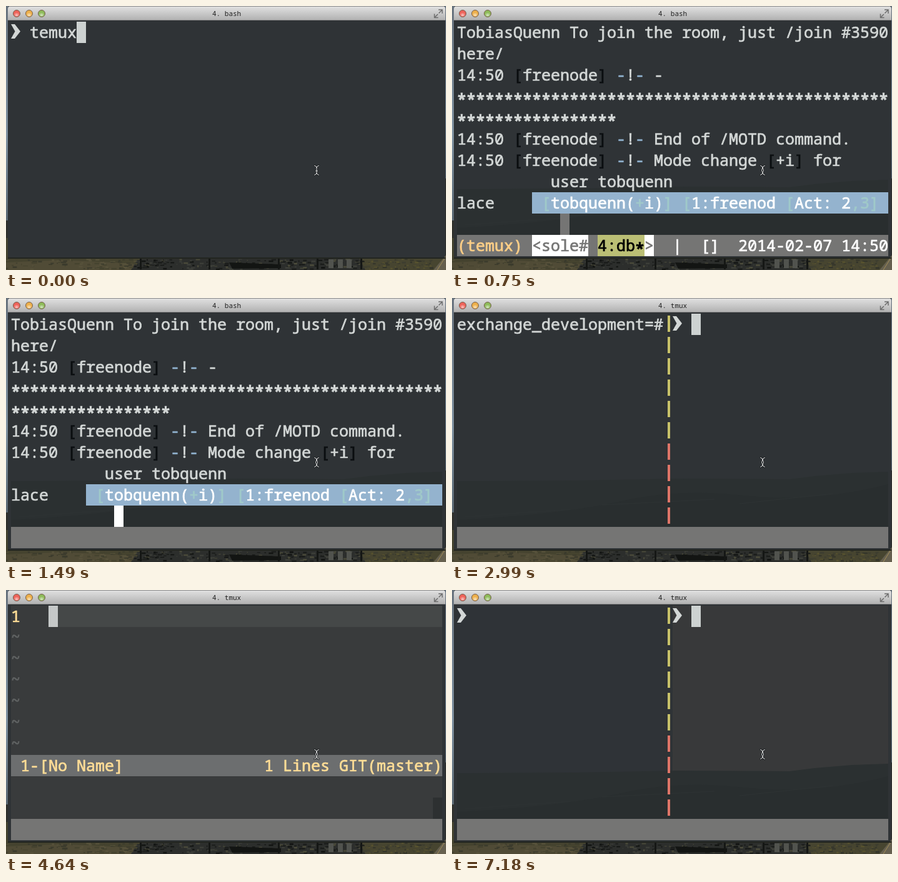
Recreate the animation shown at these times as an HTML page. Size 704 px wide and 421 px high, loop 8 s.

```html
<!DOCTYPE html>
<html lang="en">
<head>
<meta charset="utf-8">
<title>Terminal session</title>
<style>
  html, body { margin: 0; width: 100%; height: 100%; overflow: hidden; background: #2f3336; }
  svg { display: block; width: 704px; height: 421px; }
  text { font-family: "Noto Sans Mono", "DejaVu Sans Mono", monospace; white-space: pre; }
</style>
</head>
<body>
<svg id="stage" viewBox="0 0 704 421" xmlns="http://www.w3.org/2000/svg">
  <defs>
    <linearGradient id="bar" x2="0" y2="1">
      <stop stop-color="#e2e2e2"/><stop offset="1" stop-color="#b0b0b0"/>
    </linearGradient>
    <linearGradient id="sky" x2="0" y2="1">
      <stop stop-color="#67727d"/><stop offset=".6" stop-color="#8294a3"/><stop offset="1" stop-color="#5c6a75"/>
    </linearGradient>
    <radialGradient id="gloss" cy=".8">
      <stop stop-color="#fff" stop-opacity=".65"/><stop offset="1" stop-color="#fff" stop-opacity="0"/>
    </radialGradient>
  </defs>
  <g id="desktop"></g>
  <path d="M3 23H703V396Q703 401 698 401H8Q3 401 3 396Z" fill="#2f3336"/>
  <g id="screens"></g>
  <g id="chrome">
    <path d="M3 23V5Q3 0 8 0H698Q703 0 703 5V23Z" fill="url(#bar)"/>
    <path d="M6 .5H700" stroke="#8a8a8a"/>
    <path d="M3 22.5H703" stroke="#8c8c8c"/>
    <path d="M692 6H698V12M698 6L692.5 11.5M685.500 12.500V18.500H691.500M685.500 18.500L691 13" fill="none" stroke="#6c6c6c" stroke-width="1.500"/>
    <text id="title" x="330" y="16" font-size="11" fill="#222"></text>
  </g>
  <g id="mouse" fill="none" stroke-linecap="round"></g>
</svg>
<script>
const NS = "http://www.w3.org/2000/svg";
const CELL = 15, ROW = 34, LEFT = 8, TOP = 25;
const LOOP = 8000;
const INK = "#d3d7d6", DARK = "#0b0e10", BLUE = "#91b2cf", TEAL = "#a0c9c9";
const GOLD = "#ffdd96", GRAY = "#757574", DIM = "#616464", OLIVE = "#bcbd68", WHITE = "#fff";
const byId = id => document.getElementById(id);

function add(parent, tag, attrs, content) {
  const node = document.createElementNS(NS, tag);
  for (const key in attrs) node.setAttribute(key, attrs[key]);
  if (content !== undefined) node.textContent = content;
  parent.append(node);
  return node;
}
const rect = (g, x, y, width, height, fill) => add(g, "rect", { x, y, width, height, fill });
const path = (g, d, fill, extra) => add(g, "path", { d, fill, ...extra });
const cells = (g, col, row, cols, fill, rows = 1) =>
  rect(g, LEFT + col * CELL, TOP + row * ROW, cols * CELL, rows * ROW, fill);
// The thin outline gives the text a medium weight.
const put = (g, col, row, str, fill = INK, dy = 0, weight = 0.7) => add(g, "text", {
  x: LEFT + col * CELL, y: TOP + row * ROW + 26 + dy, fill, "font-size": 25, stroke: fill, "stroke-width": weight,
}, str);

// Alternating strings and colours, set one after another on a row.
function spans(g, col, row, ...parts) {
  for (let i = 0; i < parts.length; i += 2) {
    put(g, col, row, parts[i], parts[i + 1]);
    col += parts[i].length;
  }
}
const stars = (g, col, row, n, fill) => put(g, col, row, "*".repeat(n), fill, 5, 1.4);

function prompt(g, col) {
  path(g, `M${LEFT + col * CELL} 29h6l9 11.500l-9 11.500h-6l6.500-11.500z`, INK);
}
const cursor = (g, col, row, fill = "#cdd2d1") => cells(g, col, row, 1, fill);
const statusBar = g => cells(g, 0, 10, 46, GRAY);

function hills(g) {
  path(g, "M8 292L200 291L360 288L540 289L580 284L640 279L698 277V365H8Z", "#2b3031");
  path(g, "M8 354Q180 345 270 324T470 315T698 297V365H8Z", "#292e2f");
  path(g, "M20 349L190 337M240 330L420 321M460 328L610 312", "none", { stroke: "#2e3334" });
}

function divider(g) {
  for (let row = 0; row < 10; row++)
    rect(g, 345, TOP + row * ROW + 3, 4, 26, row < 6 ? "#c8c269" : "#df7568");
}
function rightPane(g) {
  divider(g);
  prompt(g, 23);
  cursor(g, 25, 0);
}
function tildes(g, first) {
  for (let row = first; row < 7; row++) put(g, 0, row, "~", DIM, -2);
}

function chat(g, cursorFill) {
  hills(g);
  put(g, 0, 0, "TobiasQuenn To join the room, just /join #3590");
  put(g, 0, 1, "here/");
  const notice = (row, ...rest) => spans(g, 0, row, "14:50 ", INK, "[", DARK, "freenode", INK, "] ", DARK,
    "-", BLUE, "!", INK, "- ", BLUE, ...rest);
  notice(2, "-", INK);
  stars(g, 0, 3, 46);
  stars(g, 0, 4, 17);
  notice(5, "End of /MOTD command.", INK);
  notice(6, "Mode change ", INK, "[", DARK, "+i", INK, "]", DARK, " for", INK);
  put(g, 10, 7, "user tobquenn");
  put(g, 0, 8, "lace");
  cells(g, 8, 8, 38, "#94b3ce");
  spans(g, 9, 8, "[", TEAL, "tobquenn(", WHITE, "+", TEAL, "i)", WHITE, "] [", TEAL,
    "1:freenod ", WHITE, "[", TEAL, "Act: 2", WHITE, ",3]", TEAL);
  cursor(g, 11, 9, cursorFill);
  statusBar(g);
}

function windowList(g, before, active) {
  const start = 8 + before.length + 1, end = start + active.length + 1;
  put(g, 0, 10, "(temux)", "#ffcf87");
  cells(g, 8, 10, before.length, WHITE);
  put(g, 8, 10, before, GRAY);
  cells(g, start, 10, active.length + 1, "#bbbf75");
  put(g, start, 10, active, "#000");
  stars(g, end - 1, 10, 1, "#000");
  cells(g, end, 10, 1, WHITE);
  put(g, end, 10, ">", GRAY);
  spans(g, 23, 10, "|  []  2014-02-07 14:50", WHITE);
}

const scenes = [
  { at: 0, draw(g) {
    prompt(g, 0);
    put(g, 2, 0, "temux");
    cursor(g, 7, 0);
  } },
  { at: 600, draw(g) { cursor(g, 0, 10); } },
  { at: 750, draw(g) { chat(g, GRAY); windowList(g, "<sole#", "4:db"); } },
  { at: 1350, draw(g) { chat(g, WHITE); windowList(g, "<le#", "4:irssi"); } },
  { at: 1490, draw(g) { chat(g, WHITE); } },
  { at: 2990, draw(g) {
    hills(g);
    put(g, 0, 0, "exchange_development=#");
    rightPane(g);
    statusBar(g);
  } },
  { at: 4640, draw(g) {
    cells(g, 0, 0, 46, "#393b3c", 10);
    cells(g, 4, 0, 42, "#454848");
    put(g, 0, 0, "1", GOLD);
    cursor(g, 4, 0, "#c5c8c8");
    tildes(g, 1);
    cells(g, 0, 7, 46, "#6c6e6f");
    put(g, 1, 7, "1-[No Name]", GOLD);
    put(g, 27, 7, "1 Lines GIT(master)", GOLD);
    cells(g, 45, 9, 1, "#2d3031");
    statusBar(g);
  } },
  { at: 5830, draw(g) {
    cells(g, 0, 0, 46, "#38393a", 10);
    hills(g);
    cells(g, 0, 7, 22, "#38393a", 3);
    cells(g, 21, 9, 1, "#2d3132");
    put(g, 2, 0, "1", DIM);
    cells(g, 4, 1, 18, "#474849");
    put(g, 2, 1, "2", GOLD);
    put(g, 4, 1, "o", "#c5c8c8");
    tildes(g, 2);
    cells(g, 0, 7, 22, "#6c6e6f");
    put(g, 1, 7, "<+2 Lines GIT(master)", GOLD);
    put(g, 0, 9, "-- INSERT --", OLIVE);
    rightPane(g);
    statusBar(g);
  } },
  { at: 7180, draw(g) {
    cells(g, 0, 0, 22, "#2f3337", 10);
    cells(g, 23, 0, 23, "#38393a", 10);
    hills(g);
    prompt(g, 0);
    rightPane(g);
    statusBar(g);
  } },
];

function drawDesktop(g) {
  let seed = 7;
  const random = () => (seed = seed * 16807 % 2147483647) / 2147483647;
  const specks = (count, x, width, size, fills) => {
    for (let i = 0; i < count; i++)
      rect(g, x + random() * width, 403 + random() * 16, 1 + random() * size, 1 + random() * 2, fills[i % fills.length]);
  };
  rect(g, 0, 0, 704, 421, "#30312d");
  rect(g, 0, 0, 4, 342, "url(#sky)");
  rect(g, 702, 0, 2, 275, "url(#sky)");
  path(g, "M0 370H3V402H215V421H0Z", "#45432f");
  path(g, "M0 409L90 405L205 411V421H0Z", "#504b36");
  path(g, "M210 405L330 402H575V421H200Z", "#2c2e2c");
  path(g, "M565 402H704V421H575Z", "#474530");
  path(g, "M704 397L684 421H704Z", "#66604f");
  path(g, "M702 402L690 421", "none", { stroke: "#a38e57" });
  specks(90, 0, 205, 8, ["#3a3a2c", "#57523b", "#45432f"]);
  specks(190, 205, 365, 7, ["#131513", "#3d3f39", "#4a4a3a", "#1b1d1b"]);
  specks(70, 565, 115, 6, ["#33342a", "#57522f", "#3e3e30"]);
  path(g, "M357 409L440 412V418L362 419Z", "#131513");
  for (const x of [516, 531, 545]) rect(g, x, 404, 8, 14, "#51534e");
  for (const x of [214, 324, 435, 497, 567]) rect(g, x, 401, 3, 19, "#151715");
  rect(g, 3, 401, 700, 2, "#222520");
}

function drawMouse(g, curved) {
  const d = curved
    ? "M493.500 254.500Q497 255 497 258.500Q497 255 500.500 254.500M497 258.500Q494 262 497 265.500Q500 262 497 258.500M493.500 269.500Q497 269 497 265.500Q497 269 500.500 269.500"
    : "M493.500 254.500Q497 255 497 258Q497 255 500.500 254.500M497 258V266M493.500 269.500Q497 269 497 266Q497 269 500.500 269.500M495.500 263H498.500";
  path(g, d, "none", { stroke: "#15191b", "stroke-width": 2.4 });
  path(g, d, "none", { stroke: "#e8e8e8", "stroke-width": 1 });
}

drawDesktop(byId("desktop"));
["#ee6259", "#edaf49", "#8dbb58"].forEach((fill, i) => {
  const light = { cx: 17 + 20 * i, cy: 12, r: 5.5 };
  add(byId("chrome"), "circle", { ...light, fill, stroke: "#77604f" });
  add(byId("chrome"), "circle", { ...light, r: 4.5, fill: "url(#gloss)" });
});
for (const scene of scenes) {
  scene.group = add(byId("screens"), "g", {});
  scene.draw(scene.group);
}
const pointers = [false, true].map(curved => {
  const group = add(byId("mouse"), "g", {});
  drawMouse(group, curved);
  return group;
});

const show = (node, visible) => node.setAttribute("visibility", visible ? "visible" : "hidden");

function render(t) {
  const current = scenes.findLast(scene => t >= scene.at);
  for (const scene of scenes) show(scene.group, scene === current);
  pointers.forEach((group, i) => show(group, i === Number(t >= 600)));
  byId("title").textContent = t < 2540 ? "4. bash" : "4. tmux";
}

const start = performance.now();
function tick() {
  render((performance.now() - start) % LOOP);
  requestAnimationFrame(tick);
}
tick();
</script>
</body>
</html>
```
